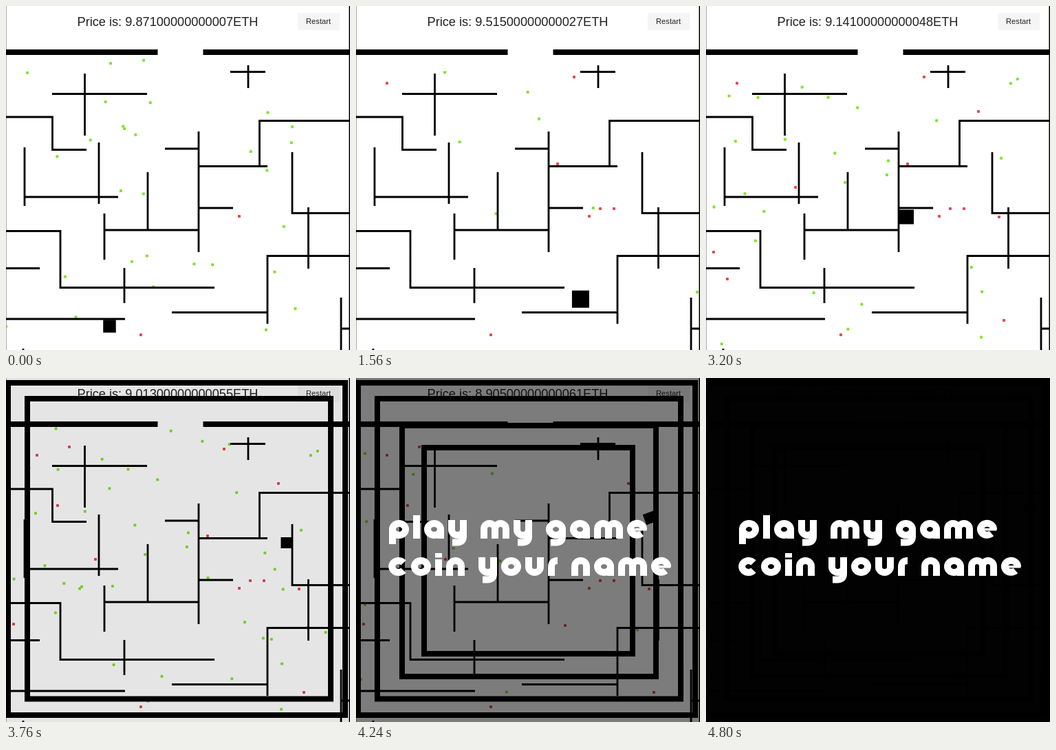
Animation of 500 by 499 pixels, one loop 5200 ms. Source, as an HTML page with a canvas:

```html
<!DOCTYPE html>
<html lang="en">
<head>
<meta charset="utf-8">
<title>play my game, coin your name</title>
<style>
html, body { margin: 0; width: 100%; height: 100%; overflow: hidden; background: #fff }
canvas { display: block }
</style>
</head>
<body>
<canvas width="500" height="499"></canvas>
<script>
const ctx = document.querySelector('canvas').getContext('2d');
const LOOP = 5200, STEP = 40;

const maze = new Path2D(`
  M0 161H67.5V208.5H117 M67 127.5H205 M114.5 98V188 M326 95.5H377 M352 86V119
  M499 166.5H368.5V232 M231 207H280 M280 182V357 M280 232.5H380 M280 293H330
  M27 205V290 M27 277H163 M135 198V287 M206 241V325 M143 301V368 M143 325H280
  M416 212V300.5H499 M439.5 292V381 M0 326.5H79V408.5H303 M172 380V431 M0 380.5H49
  M499 362.5H380V461 M241 444.5H380 M0 454H173 M487 423V499 M487 468H499 M25 497V499`);

const redSpots = [
  [339, 305], [196, 477], [293, 229], [355, 294], [375, 294], [45, 112], [317, 103], [396, 153],
  [426, 306], [433, 456], [130, 263], [11, 357], [31, 396], [75, 185], [92, 100], [304, 359]
];

// Moments when the green coins are cleared and start to pile up again
const resets = [-960, 370, 1290, 2310, 3910];

// time, x, y, size, angle
const poses = [
  [0, 150.5, 464.5, 18.5, 0], [800, 294.5, 459, 25, 0], [1050, 222, 459, 25, 0], [1200, 222, 427, 25, 0],
  [1600, 338, 425, 25, 0], [2280, 361, 268, 23, .26], [2700, 346, 307, 22, .1], [3200, 291.5, 306, 21, 0],
  [3480, 350, 299, 18, .4], [3760, 407.5, 239, 16, 0], [4240, 427, 203, 16, -.35], [4800, 470, 190, 16, -.9]
];

// left, top, width, height
const frames = [[3, 7, 490, 482], [31, 30, 441, 435.5], [67, 69, 369, 364], [99, 101, 303, 299]];

// Lettering: advance width and centre line of each letter
const ring = 'M5-13.5a9.5 8.5 0 1 1 19 0a9.5 8.5 0 1 1-19 0';
const cup = 'M5-27V-13a8.5 8 0 0 0 17 0V-27';
const glyphs = {
  p: [29, ring + 'M5 8V-13.5'],
  l: [10, 'M5 0V-34'],
  a: [29, ring + 'M24 0V-13.5'],
  y: [27, cup + 'M22-13V-3Q22 5.5 13 5.5H6'],
  m: [42, 'M5 0V-14a8 8 0 0 1 16 0V0M21 0V-14a8 8 0 0 1 16 0V0'],
  g: [29, ring + 'M24-13.5V-3Q24 5.5 15 5.5H7'],
  e: [28, 'M24-13.5a9.5 8.5 0 1 0-3 6M14-15V-11.5M23.5-15V-11.5'],
  c: [27, 'M22-19A9.5 8.5 0 1 0 22-8'],
  o: [29, ring],
  i: [10, 'M5 0V-24M5-26.5V-33'],
  n: [27, 'M5 0V-14a8.5 8 0 0 1 17 0V0'],
  u: [27, cup],
  r: [14, 'M5 0V-13Q5-22 14-22'],
  ' ': [8, '']
};

function poseAt(t) {
  const i = Math.max(1, poses.findIndex(p => p[0] >= t));
  const a = poses[i - 1], b = poses[i];
  const k = (t - a[0]) / (b[0] - a[0]);
  return a.map((v, j) => v + (b[j] - v) * k);
}

function noise(n) {
  const v = Math.sin(n * 12.9898) * 43758.5453;
  return v - Math.floor(v);
}

function box(color, x, y, w, h) {
  ctx.fillStyle = color;
  ctx.fillRect(x, y, w, h);
}

function dot(color, x, y) {
  ctx.fillStyle = color;
  ctx.beginPath();
  ctx.roundRect(x - 2, y - 2, 4, 4, 1);
  ctx.fill();
}

function label(text, size, x, y) {
  ctx.font = `${size}px "Liberation Sans", Arial, sans-serif`;
  ctx.fillStyle = '#222';
  ctx.fillText(text, x, y);
}

function drawCoins(t) {
  const start = resets.findLast(r => r <= t);
  for (let i = 0; i < Math.floor((t - start) / 33); i++) {
    dot('#7fe52a', noise(start + i) * 500, 70 + noise(start + i + .5) * 429);
  }
  const redCount = Math.floor(2.3 + t / 290);
  for (const [x, y] of redSpots.slice(0, redCount)) dot('#e5484d', x, y);
}

function drawMaze() {
  box('#aaa', 0, 0, 1, 499);
  box('#000', 498.5, 0, 1.5, 499);
  box('#000', 0, 63, 220.5, 8);
  box('#000', 286.5, 63, 213, 8);
  ctx.strokeStyle = '#000';
  ctx.lineWidth = 2.8;
  ctx.stroke(maze);
}

function drawPlayer(t) {
  const [, x, y, size, angle] = poseAt(Math.min(t, 4800));
  ctx.save();
  ctx.translate(x, y);
  ctx.rotate(angle);
  box('#000', -size / 2, -size / 2, size, size);
  ctx.restore();
}

// The price falls by 0.002 at a time; its last digits are the summed rounding error.
function drawHeader(t) {
  const price = 9871 - 2 * Math.round(t * .114);
  const drift = String(Math.round((10000 - price) / 18)).padStart(2, '0');
  label(`Price is: ${(price / 1000).toFixed(3)}000000000${drift}ETH`, 18.2, 103.5, 29);
  box('#f5f5f5', 424, 10, 61, 25);
  label('Restart', 11.2, 436, 26);
}

function drawFrames(t) {
  ctx.lineWidth = 8;
  frames.forEach((frame, i) => {
    if (t >= 3560 + i * 200) ctx.strokeRect(...frame);
  });
}

function drawLettering(text, x, y) {
  ctx.save();
  ctx.translate(x, y);
  ctx.strokeStyle = '#fff';
  ctx.lineWidth = 10;
  for (const letter of text) {
    const [width, path] = glyphs[letter];
    ctx.stroke(new Path2D(path));
    ctx.translate(width + 6, 0);
  }
  ctx.restore();
}

function draw(now) {
  const t = Math.floor((now % LOOP) / STEP) * STEP;
  box('#fff', 0, 0, 500, 499);
  drawCoins(t);
  drawMaze();
  drawPlayer(t);
  drawHeader(t);
  drawFrames(t);
  const fade = Math.min(1, Math.max(0, (t - 3640) / 1170));
  box(`rgba(0, 0, 0, ${fade})`, 0, 0, 500, 499);
  if (t >= 4120) {
    drawLettering('play my game', 48, 233);
    drawLettering('coin your name', 47, 287);
  }
  requestAnimationFrame(draw);
}
requestAnimationFrame(draw);
</script>
</body>
</html>
```
